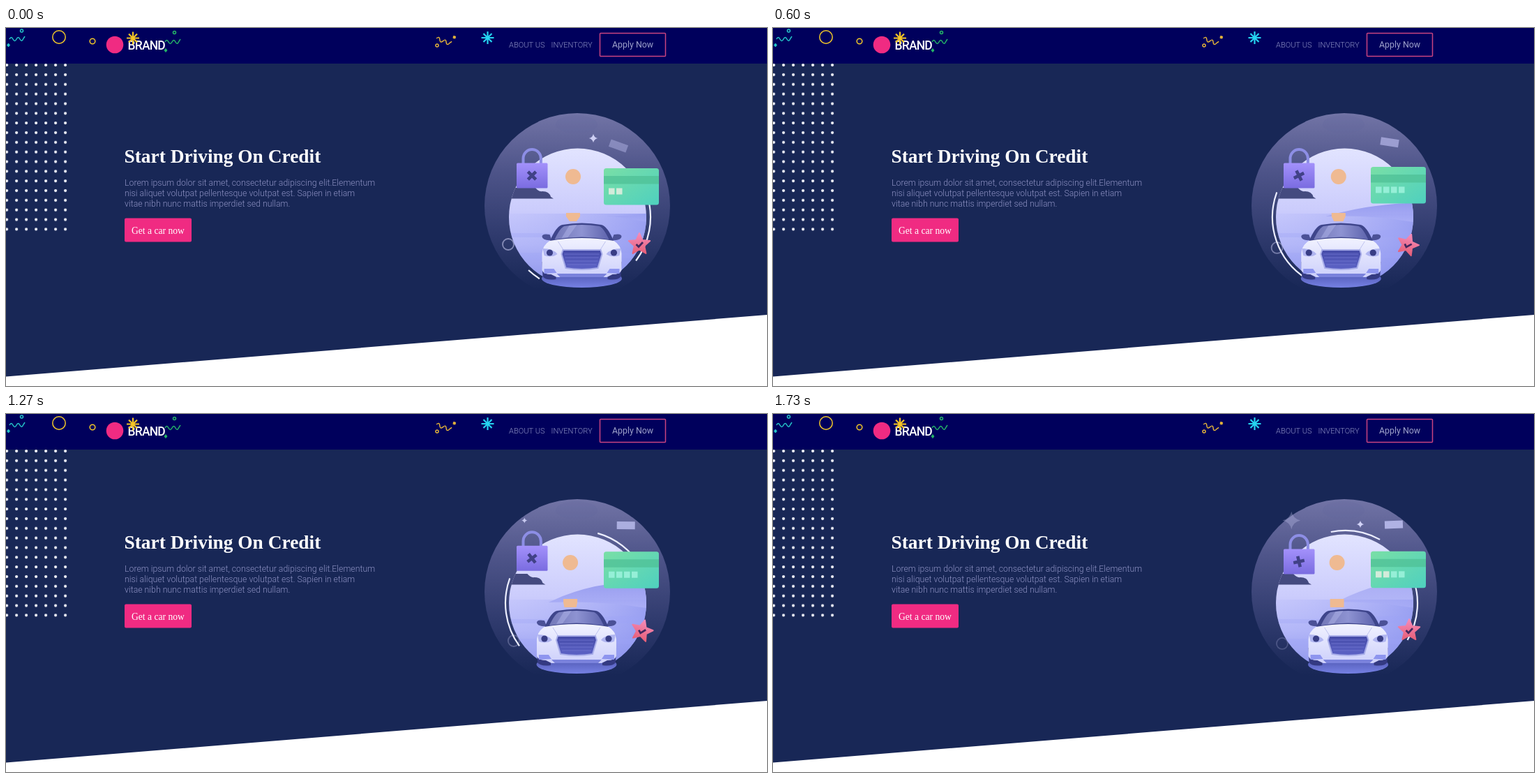
These frames come from a looping animation (1091x513 px, 1.79 s). An HTML page:

```html
<!DOCTYPE html>
<html lang="en">
<head>
<meta charset="utf-8">
<title>Start Driving On Credit</title>
<style>
  html, body { margin: 0; width: 100%; height: 100%; overflow: hidden; background: #182756; }
  svg { display: block; width: 1091px; height: 513px; }
  text { font-family: Roboto, sans-serif; }
  .light { font-weight: 300; fill: #8d91c3; }
  .serif { font-family: "Liberation Serif", serif; fill: #fff; }
  .line { fill: none; stroke-width: 1.5; }
</style>
</head>
<body>
<svg viewBox="0 0 1091 513">
  <defs>
    <linearGradient id="globe" x2="0" y2="1">
      <stop stop-color="#7274a6"/><stop offset=".3" stop-color="#4f558a"/>
      <stop offset=".65" stop-color="#303b6e"/><stop offset=".95" stop-color="#182756"/>
    </linearGradient>
    <linearGradient id="sky" x2="0" y2="1">
      <stop stop-color="#e2e4ff"/><stop offset=".45" stop-color="#cbccfc"/>
      <stop offset=".7" stop-color="#b3b7f8"/><stop offset="1" stop-color="#7882e4"/>
    </linearGradient>
    <linearGradient id="sea"><stop stop-color="#b9bcfa" stop-opacity=".3"/><stop offset="1" stop-color="#8c94ef"/></linearGradient>
    <linearGradient id="hillFill" x2="0" y2="1"><stop stop-color="#9398ee"/><stop offset="1" stop-color="#adb1f7"/></linearGradient>
    <linearGradient id="lockFill" x2="0" y2="1"><stop stop-color="#a391fb"/><stop offset="1" stop-color="#7a6ce0"/></linearGradient>
    <linearGradient id="cardFill" x2="1" y2="1"><stop stop-color="#79dfa6"/><stop offset="1" stop-color="#4fd0bf"/></linearGradient>
    <linearGradient id="starFill" x2="0" y2="1"><stop stop-color="#f58cba"/><stop offset="1" stop-color="#e65f78"/></linearGradient>
    <linearGradient id="bodyFill" x2="0" y2="1"><stop stop-color="#f1f2ff"/><stop offset="1" stop-color="#cdd0fb"/></linearGradient>
    <linearGradient id="glass"><stop stop-color="#7378b8"/><stop offset=".5" stop-color="#8e93d2"/><stop offset="1" stop-color="#5e64ad"/></linearGradient>
    <linearGradient id="grille" x2="0" y2="1"><stop stop-color="#454ba8"/><stop offset="1" stop-color="#5d63c6"/></linearGradient>
    <linearGradient id="puddle" x2="0" y2="1"><stop stop-color="#4850a8"/><stop offset="1" stop-color="#7681e4"/></linearGradient>
    <clipPath id="inner"><circle cx="819.5" cy="271" r="98.5"/></clipPath>
    <clipPath id="frame"><rect x="680" y="115" width="280" height="257.5"/></clipPath>
    <path id="wave" class="line" d="M0 2q2.5-5 5 0t5 0 5 0 5-1l2-3"/>
    <path id="burst" d="M0-9V9M-9 0H9M-6-6 6 6M-6 6 6-6" stroke-width="2.2"/>
    <path id="glint" d="M0-1Q.18-.18 1 0 .18.18 0 1-.18.18-1 0-.18-.18 0-1"/>
    <pattern id="dots" x="-5.9" y="46.1" width="14" height="13.84" patternUnits="userSpaceOnUse">
      <circle cx="7" cy="7" r="2.1" fill="#f2f3fb"/>
    </pattern>
  </defs>

  <rect width="1091" height="513" fill="#182756"/>
  <rect y="51" width="90" height="243" fill="url(#dots)"/>
  <path d="M0 499.5 1091 411V513H0Z" fill="#fff"/>
  <rect width="1091" height="51" fill="#00005c"/>

  <g stroke="#25c5c9"><use href="#wave" x="5" y="14"/><circle class="line" cx="22.5" cy="4" r="2"/><path d="m3.5 22 2 2.5-2 2.5-2-2.5z" fill="#25c5c9"/></g>
  <g class="line" stroke="#f3c928"><circle cx="76" cy="13" r="9.2"/><circle cx="124" cy="19" r="3.8"/></g>
  <circle cx="156" cy="24" r="12.3" fill="#f02b82"/>
  <text x="174.5" y="31" font-size="17.5" font-weight="500" letter-spacing="-.8" fill="#fff">BRAND</text>
  <use href="#burst" x="182" y="14.5" stroke="#f6c524"/>
  <g stroke="#25b667"><use href="#wave" x="228" y="18"/><circle class="line" cx="241.5" cy="6.5" r="2"/><path d="m229 29.5 2 2.5-2 2.5-2-2.5z" fill="#25b667"/></g>
  <g stroke="#e3b33a"><use href="#wave" transform="translate(618 13) rotate(22)"/><circle class="line" cx="618" cy="25" r="2"/><path d="m641.5 11.5 3 .5-.5 3-3-.5z" fill="#e3b33a"/></g>
  <use href="#burst" x="690.5" y="14" stroke="#25d4f0"/>

  <text class="light" x="721" y="28" font-size="11.1">ABOUT US</text>
  <text class="light" x="781.5" y="28" font-size="11.1">INVENTORY</text>
  <rect class="line" x="851.5" y="7.5" width="94" height="33" rx="1" stroke="#c9437f"/>
  <text x="869" y="28" font-size="12.4" fill="#9da1c9">Apply Now</text>

  <text class="serif" x="169.5" y="193" font-size="27.4" font-weight="700">Start Driving On Credit</text>
  <g class="light" font-size="12.3">
    <text x="170" y="225.5">Lorem ipsum dolor sit amet, consectetur adipiscing elit.Elementum</text>
    <text x="170" y="240.5">nisi aliquet volutpat pellentesque volutpat est. Sapien in etiam</text>
    <text x="170" y="255.5">vitae nibh nunc mattis imperdiet sed nullam.</text>
  </g>
  <rect x="170" y="272.5" width="96" height="34" rx="2" fill="#f02b82"/>
  <text class="serif" x="180" y="295" font-size="13.6">Get a car now</text>

  <circle cx="819" cy="255" r="133" fill="url(#globe)"/>
  <ellipse cx="818" cy="138" rx="30" ry="13" fill="#62659a" opacity=".2"/>
  <g clip-path="url(#frame)">
    <circle id="ring" r="8" fill="none" stroke="#a3a7cf" stroke-width="1.8"/>
    <circle cx="819.5" cy="271" r="98.5" fill="url(#sky)"/>
    <g clip-path="url(#inner)">
      <rect x="720" y="266" width="200" height="106" fill="url(#sea)" opacity=".75"/>
      <path id="hill" fill="url(#hillFill)"/>
      <path d="M720 294h60q30 4 70-2t70 1v7H720zM720 322h200v9q-60-4-100 1t-100-2z" fill="#9da4f5" opacity=".3"/>
      <g id="sun" fill="#efba92"><circle cy="213" r="11"/><path id="glow"/></g>
      <path id="cloud" d="M715 244.5V229h44q5 6 10 5 10 0 12 8l4 2.5z" fill="#444a7f"/>
    </g>
    <path id="arcs" fill="none" stroke="#eceeff" stroke-width="2.2"/>

    <g id="car">
      <ellipse cy="359" rx="57.5" ry="13" fill="url(#puddle)"/>
      <path d="M-43 304Q-56 305-57 299-57 294-46 296ZM43 304Q56 305 57 299 57 294 46 296Z" fill="#4b5197"/>
      <path d="M-46 306Q-37 284-28 282 0 277 28 282 37 284 46 306Z" fill="#3e458b"/>
      <path d="M-39 303Q-31 286-25 284 0 280 25 284 31 286 39 303Q0 296-39 303Z" fill="url(#glass)"/>
      <path d="M-18 283-29 301-20 300-7 282Z" fill="#b4b8ea" opacity=".45"/>
      <path d="M-57 335h20v25q-15 2-19-4zM57 335H37v25q15 2 19-4z" fill="#343a82"/>
      <path d="M-46 305Q0 297 46 305 56 311 57 323V347Q55 353 44 353L36 357H-36L-44 353Q-55 353-57 347V323Q-56 311-46 305Z" fill="url(#bodyFill)"/>
      <path d="M-34 306-27 317M34 306 27 317" stroke="#bfc3ef"/>
      <path d="M-27 318H27L29 324 23 344Q0 348-23 344L-29 324Z" fill="url(#grille)" stroke="#a9aee9" stroke-width="2"/>
      <path d="M-25 324H25M-24 329H24M-23 334H23M-21 339H21" stroke="#7278d2" stroke-width=".8"/>
      <g id="lamp"><path d="M-56 316Q-41 316-35 324-43 330-54 326Z" fill="#b0b5f0"/><circle cx="-46" cy="322" r="4.6" fill="#393e85"/><path d="M-54 345h14l4 6-18 1z" fill="#8e95ef"/></g>
      <use href="#lamp" transform="scale(-1 1)"/>
      <path d="M-36 352H36L31 357H-31Z" fill="#7a82dc"/>
    </g>

    <path id="slip" d="M-13-5.5h26v11h-26z" fill="#b0b2e4"/>
    <use id="glintA" href="#glint" fill="#d7d8fb"/>
    <use id="glintB" href="#glint" fill="#c7c9f0"/>

    <g id="lock">
      <path d="M741.5 196V187a12.7 13 0 0 1 25.4 0V196" fill="none" stroke="#8d8ee5" stroke-width="4"/>
      <rect x="732" y="193.5" width="44.5" height="36" rx="1.5" fill="url(#lockFill)"/>
      <path id="cross" d="M-8 0H8M0-8V8" stroke="#414187" stroke-width="4.6"/>
    </g>

    <g id="card">
      <rect x="857" width="79" height="52.5" rx="3.5" fill="url(#cardFill)"/>
      <path d="M857 11h79v11.5h-79z" fill="#4dbf94" opacity=".7"/>
      <g id="digits"></g>
    </g>

    <g id="badge">
      <path id="star" fill="url(#starFill)" stroke="url(#starFill)" stroke-width="2" stroke-linejoin="round"/>
      <path d="m-4.5 0 3.5 3.5 6-6.5" fill="none" stroke="#43285f" stroke-width="2.8"/>
    </g>
  </g>
</svg>
<script>
const LOOP = 1790, STEPS = 27, STEP_MS = 200 / 3;
const { PI, sin, cos, min, max, floor } = Math;
const byId = id => document.getElementById(id);
const set = (id, attrs) => {
  for (const name in attrs) byId(id).setAttribute(name, attrs[name]);
};
const place = (id, x, y, extra = '') => set(id, { transform: `translate(${x} ${y}) ${extra}` });

// Progress of p through [from, to], held at 0 and 1 outside.
const ramp = (p, from, to) => min(1, max(0, (p - from) / (to - from)));
const easeOut = u => sin(u * PI / 2);
const smooth = u => u * u * (3 - 2 * u);

function arc(from, to) {
  if (from >= to) return '';
  const point = deg => {
    const a = deg * PI / 180;
    return `${820 + 104 * cos(a)} ${271 + 104 * sin(a)}`;
  };
  return `M${point(from)}A104 104 0 0 1 ${point(to)}`;
}

// The head shoots ahead while the tail follows evenly, across the loop's seam.
function chasingArc(p) {
  const u = (p - .4 + 1) % 1 / .9;
  return u < 1 ? arc(225 + 180 * u, 235 + 187 * easeOut(u)) : '';
}

// Grows, rests, shrinks from behind, then runs on around the rim.
function restingArc(p) {
  const run = 540 * max(0, p - .78);
  return arc(122 + 38 * ramp(p, .6, .78) + run, 133 + 67 * ramp(p, 0, .26) + run);
}

function twinkle(id, x, y, size, born, life, p) {
  const age = (p - born + 1) % 1 / life;
  place(id, x, y, `scale(${age < 1 ? size * age : 0})`);
  set(id, { opacity: max(0, 1 - age ** 4) });
}

const starPoints = Array.from({ length: 10 }, (_, i) => {
  const r = i % 2 ? 7.5 : 16, a = (i / 5 - .5) * PI;
  return `${r * cos(a)} ${r * sin(a)}`;
});
set('star', { d: `M${starPoints.join('L')}Z` });
byId('digits').innerHTML = [0, 1, 2, 3].map(i => `<rect x="${864 + 11 * i}" y="28.5" width="8.5" height="9"/>`).join('');
const digits = [...byId('digits').children];

function draw(step) {
  const p = step / STEPS;
  const drift = easeOut(p), sink = smooth(p), swell = sin(PI * p);

  const turn = .43;
  place('car', 825.5 - 14.5 * min(p / turn, (1 - p) / (1 - turn)), 0);
  place('sun', 813 - 4.4 * drift, 0);
  const narrow = 5 * (1 - p);
  set('glow', { d: `M-10 265H10V270L${10 - narrow} 277H${narrow - 10}L-10 270Z` });
  place('cloud', -13 * drift, 0);

  const left = 775 + 87 * (1 - p / .6) ** 2, top = 264 - 25 * drift;
  set('hill', {
    d: `M${left} 270Q${left + 50} ${top + 4} ${left + 105} ${top}T930 ${top + 6}V280Q860 267 ${left} 270Z`,
    opacity: .6 + .4 * swell
  });

  set('arcs', { d: chasingArc(p) + restingArc(p) });
  place('ring', 720 + 10 * sink, 310 + 19 * sink);
  set('ring', { opacity: .75 - .45 * sink });
  place('slip', 878 + 12 * drift, 169 - 10.5 * drift, `rotate(${20 - 22 * drift})`);
  set('slip', { opacity: .5 + .5 * drift });

  twinkle('glintA', 842, 158, 12, .75, .48, p);
  twinkle('glintB', 743.3, 152.5, 14, .58, .42, p);

  place('lock', 0, -6.5 * sin(PI * ramp(p, .62, .95)));
  const wobble = 15 * sin(2 * PI * (p - .2)) * swell;
  place('cross', 754, 211.5, `rotate(${45 - 245 * p + wobble})`);

  place('card', 0, 201 - 4.2 * drift);
  digits.forEach((digit, i) => {
    const born = 1.8 * i - 3.4;
    const fresh = (step - born + STEPS) % STEPS < 3.6;
    digit.setAttribute('fill', fresh ? '#d3ebda' : '#95efd7');
    digit.setAttribute('opacity', step < born ? 0 : 1);
  });

  place('badge', 908 + 4 * drift, 310 + swell, `rotate(${25 * swell ** 2})`);
}

function tick(now) {
  draw(floor((now % LOOP + 5) / STEP_MS) % STEPS);
  requestAnimationFrame(tick);
}
draw(0);
requestAnimationFrame(tick);
</script>
</body>
</html>
```
